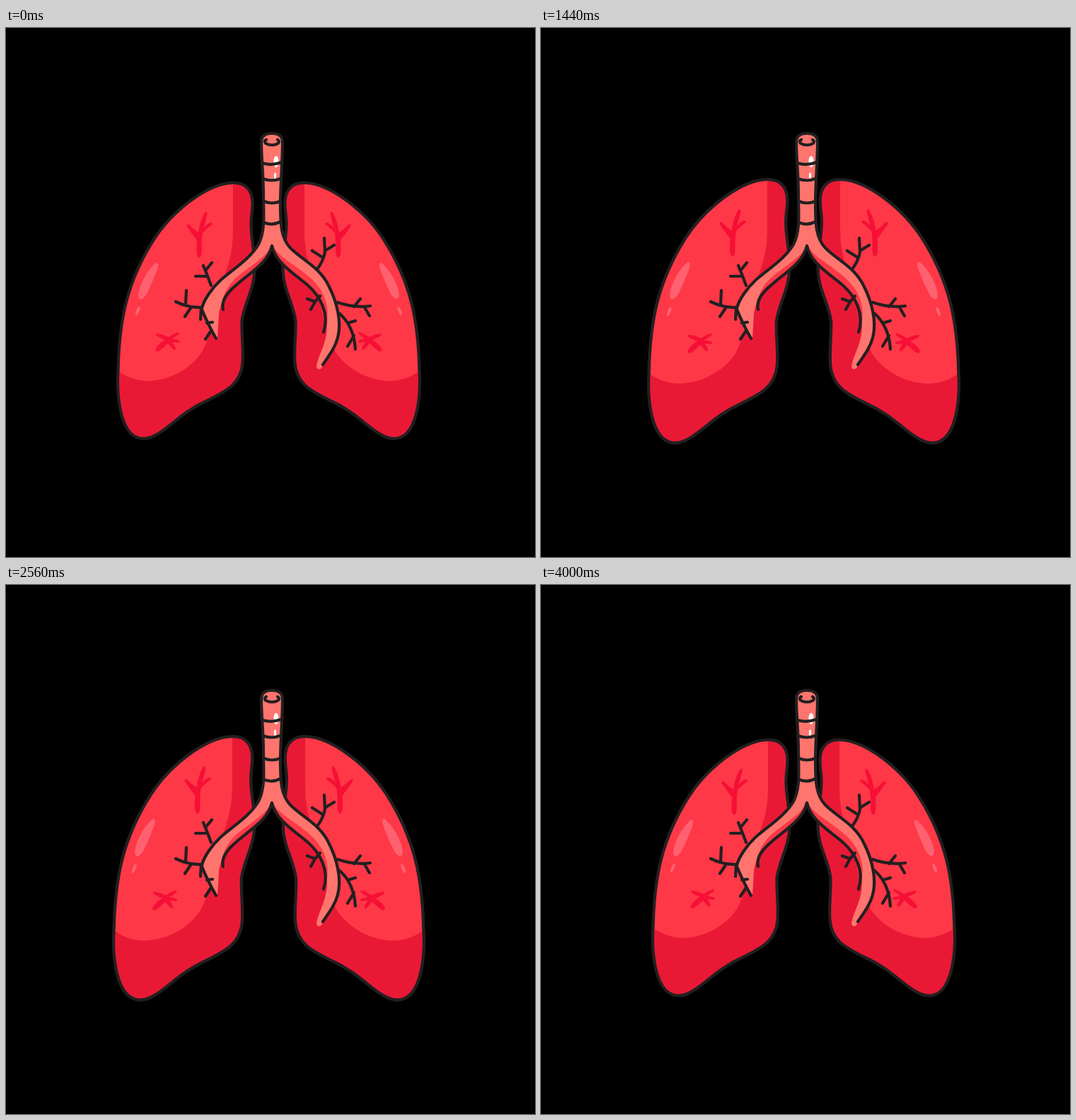
An HTML page that plays this animation: 748x748 px, repeating every 4.28 s.

```html
<!DOCTYPE html>
<html lang="en">
<head>
<meta charset="utf-8">
<title>Breathing lungs</title>
<style>
  html, body { margin: 0; width: 100%; height: 100%; overflow: hidden; background: #000; }
  svg { display: block; width: 100%; height: 100%; }
  .ink { fill: none; stroke: #231f20; stroke-width: 4.2; stroke-linecap: round; stroke-linejoin: round; }
  .dark { fill: #e91936; }
  .bright { fill: #fe3847; }
  .vein { fill: #f60f36; }
  .shine { fill: #ff6170; }
  .airway { fill: #ff756e; }
</style>
</head>
<body>
<svg viewBox="0 0 748 748">
  <defs>
    <path id="outline" d="M320 219C338 218 348 229 348.500 246C349 258 346 268 346.500 280
      C347 300 352 318 351.500 340C352 368 337 388 333.500 414C333 436 336 455 334.500 474
      C332 504 310 514 286 526C246 544 232 566 209 577C192 585 177 580 168 560
      C158 538 157 505 158.500 484C160 415 170 360 209 299C236 257 286 220 320 219Z"/>
    <clipPath id="inside"><use href="#outline"/></clipPath>
    <g id="lung">
      <use href="#outline" class="dark"/>
      <g clip-path="url(#inside)">
        <path class="bright" d="M321 200V284C321 312 317 328 308 354C296 386 296 424 277 458
          C260 484 227 500 197 499C180 498 168 492 150 480V200Z"/>
      </g>
      <g class="vein">
        <path d="M281 261Q285 258 284.500 264Q282 274 279.500 282Q285 276 290 275Q294 276 290 279
          Q283 284 278 290Q276 304 277 316Q276 325 273 325Q269 323 269.500 311Q270 304 270 300
          Q262 290 256 281Q254 276 259 278Q265 285 272 289Q274 273 281 261Z"/>
        <path d="M214 432Q222 433 230 437Q237 432 243 430Q247 431 243 434Q238 437 235 440
          Q241 440 245 442Q247 444 243 445L235 444Q239 450 240 453Q239 457 235 453L229 446
          Q222 453 216 457Q210 458 212 453Q217 445 225 441Q217 438 213 435Q211 432 214 432Z"/>
      </g>
      <g class="shine">
        <path d="M212 332Q217 332 214 341Q208 358 199 376Q193 385 189 383Q186 380 188 371Q195 347 212 332Z"/>
        <path d="M188 394Q191 394 189 399Q187 405 184 407Q182 405 184 400Q186 395 188 394Z"/>
      </g>
      <use href="#outline" class="ink"/>
    </g>
  </defs>

  <g id="left"><use href="#lung"/></g>
  <g id="right"><use href="#lung" transform="matrix(-1 0 0 1 743 0)"/></g>

  <path class="airway" d="M361 161Q361 149 376 149Q391 149 391 161C391 190 388 220 388 250
    C388 279 389 297 402 311C420 329 445 339 457 366C468 388 475 416 469 438C465 455 453 466 446 481
    Q441 485 439 479C442 460 455 446 454 416C451 395 443 378 427 364C406 346 382 333 376 308
    C370 333 346 345 325 364C311 375 303 389 301 404Q300 424 299 438Q297 442 294 436
    Q288 414 276 398C280 384 291 368 304 356C324 339 346 325 357 306C367 286 364 263 364 236Z"/>
  <path class="bright" d="M376 308C370 333 346 345 325 364C316 371 309 381 307 394
    C305 376 316 361 329 350C348 335 366 325 376 308Z
    M376 308C382 333 406 346 427 364C443 378 453 396 453 418C460 390 446 367 429 352C409 335 388 325 376 308Z"/>
  <g fill="#fff">
    <ellipse cx="382" cy="189" rx="3.600" ry="8"/>
    <ellipse cx="380.500" cy="209" rx="1.700" ry="4.500"/>
  </g>
  <g class="ink">
    <path d="M277 396C280 384 291 368 304 356C324 339 346 325 357 306C367 286 364 263 364 236
      C364 207 361 184 361 161Q361 149 376 149Q391 149 391 161C391 190 388 220 388 250
      C388 279 389 297 402 311C420 329 445 339 457 366C468 388 475 416 469 438C465 453 456 464 448 476"/>
    <path d="M307 398C304 385 314 373 325 364C346 345 370 333 376 308C382 333 406 346 427 364
      C444 379 458 404 449 430"/>
    <path d="M368 158Q364 160 367 163Q371 165.500 376 165.500Q381 165.500 385 163Q387.500 160 384 158"/>
    <path d="M362.500 191Q376 195 389 190M363 213Q376 218 388 213M364.500 245Q376 250 388 245M364.500 275Q376 280 388 274"/>
    <path d="M290 364Q285 350 279 336M291 332L282 343M268 351L285 351
      M276 395Q259 396 240 387M255 371L254 391M253 408L261 396
      M276 396L275 412M277 398Q284 416 297 439M292 416L284 417M282 440L290 428"/>
    <path d="M440 341Q449 329 451 317L450 297M464 307L451 315M433 315L447 324
      M469 388Q492 396 515 393M501 383L492 394M507 395L514 407
      M472 404Q492 422 494 454M494 414L484 417M483 450L492 435
      M444 379L437 387L426 383M437 387L431 398"/>
  </g>
</svg>
<script>
  const LOOP = 4280, BREATHS_END = 4000, HALF_BREATH = 1000, STEP = 40;
  const GROWTH = 0.054, PIVOT_Y = 378;
  const lungs = [["left", 355], ["right", 388]].map(([id, x]) => ({ node: document.getElementById(id), x }));

  // Two linear breaths, then a rest until the loop ends.
  function breathAt(ms) {
    const t = Math.floor((ms % LOOP) / STEP) * STEP;
    if (t >= BREATHS_END) return 0;
    const phase = t % (2 * HALF_BREATH);
    return 1 - Math.abs(phase / HALF_BREATH - 1);
  }

  function draw(ms) {
    const scale = 1 + GROWTH * breathAt(ms);
    for (const { node, x } of lungs) {
      node.setAttribute("transform",
        `translate(${x} ${PIVOT_Y}) scale(${scale}) translate(${-x} ${-PIVOT_Y})`);
    }
  }

  const start = performance.now();
  function tick(now) {
    draw(Math.max(0, now - start));
    requestAnimationFrame(tick);
  }
  draw(0);
  requestAnimationFrame(tick);
</script>
</body>
</html>
```
